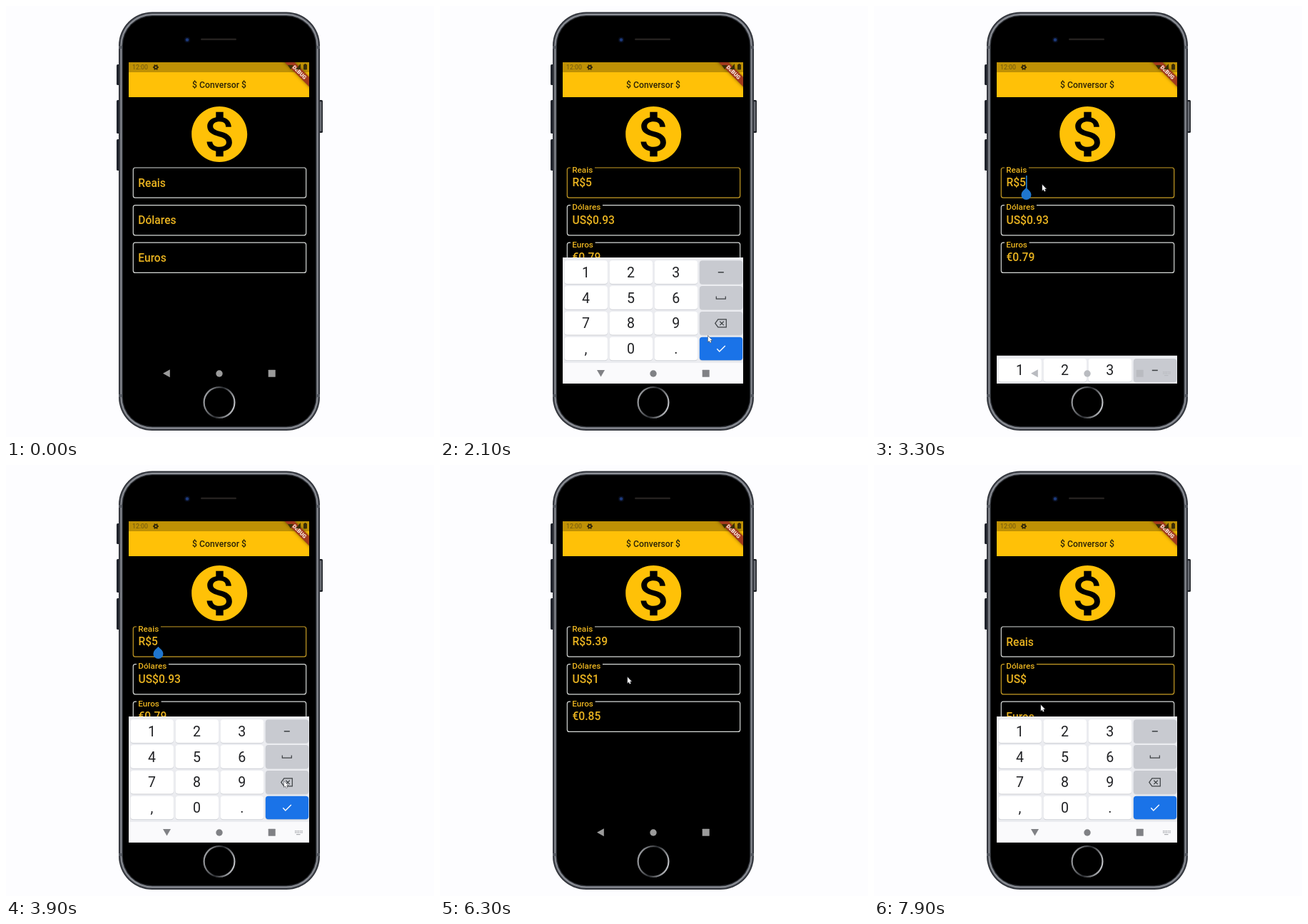
Animation of 600x605 px, one loop 8000 ms. Source, as an HTML page with a canvas:

```html
<!DOCTYPE html>
<html lang="pt">
<head>
<meta charset="utf-8">
<title>Conversor</title>
<style>
html, body { margin: 0; width: 100%; height: 100%; overflow: hidden; background: #fdfdff; }
canvas { display: block; }
</style>
</head>
<body>
<canvas id="stage" width="600" height="605"></canvas>
<script>
const ctx = document.getElementById('stage').getContext('2d');
const LOOP = 8000, END = 9e9;
const AMBER = '#ffc107', INK = '#e9b320', GREY = '#9b9b9b';
const COIN = new Path2D('M12 2C6.48 2 2 6.48 2 12s4.48 10 10 10 10-4.48 10-10S17.52 2 12 2zm1.41 16.09V20h-2.67v-1.93c-1.71-.36-3.16-1.46-3.27-3.4h1.96c.1 1.05.82 1.87 2.65 1.87 1.96 0 2.4-.98 2.4-1.59 0-.83-.44-1.61-2.67-2.14-2.48-.6-4.18-1.62-4.18-3.67 0-1.72 1.39-2.84 3.11-3.21V4h2.67v1.95c1.86.45 2.79 1.86 2.85 3.39H14.3c-.05-1.11-.64-1.87-2.22-1.87-1.5 0-2.4.68-2.4 1.64 0 .84.65 1.39 2.67 1.91s4.18 1.39 4.18 3.91c-.02 1.83-1.38 2.83-3.12 3.16z');

// Moments of the story
const TAP1 = 880, TYPE5 = 1500, DONE1 = 2120, TAP2 = 3200, ERASE1 = 4000;
const TAP3 = 4600, TYPE1 = 5030, DONE2 = 5900, TAP4 = 6400, ERASE2 = 7380;
const INPUTS = [TAP1, TYPE5, TAP2, ERASE1, TAP3, TYPE1, TAP4, ERASE2];
const KEYBOARD = [[TAP1 + 60, DONE1], [TAP2 + 40, DONE2 + 30], [TAP4 + 60, END]];
const HANDLE = [[TAP2, ERASE1], [TAP4, ERASE2]];

const FIELDS = [
  { label: 'Reais', prefix: 'R$', values: ['5', '5.39'],
    raised: [[TAP1, TAP3], [TYPE1, ERASE2]], focus: [[TAP1, DONE1], [TAP2, TAP3]] },
  { label: 'Dólares', prefix: 'US$', values: ['0.93', '1'],
    raised: [[TYPE5, ERASE1], [TAP3, END]], focus: [[TAP3, DONE2], [TAP4, END]] },
  { label: 'Euros', prefix: '€', values: ['0.79', '0.85'],
    raised: [[TYPE5, ERASE1], [TYPE1, ERASE2]], focus: [] }
];

// Pointer path: time, x, y
const POINTER = [
  [250, 330, 560], [800, 217, 249], [1150, 217, 249], [2000, 375, 461], [2300, 378, 470],
  [2900, 236, 251], [3450, 236, 251], [3850, 390, 444], [4150, 390, 444], [4550, 246, 304],
  [4700, 246, 304], [4950, 244, 332], [5250, 244, 332], [5750, 388, 478], [5950, 388, 478],
  [6250, 263, 298], [6500, 263, 298], [7000, 390, 444], [7450, 390, 444], [7850, 234, 337], [8000, 234, 337]
];

const smooth = u => { u = Math.min(1, Math.max(0, u)); return u * u * (3 - 2 * u); };
const inside = (spans, t) => spans.some(([a, b]) => t >= a && t < b);
const level = (spans, t) => spans.reduce((sum, [a, b]) => sum + smooth((t - a) / 200) - smooth((t - b) / 200), 0);

function box(x, y, w, h, r, fill) {
  ctx.beginPath();
  ctx.roundRect(x, y, w, h, r);
  ctx.fillStyle = fill;
  ctx.fill();
}
function disc(x, y, r, fill) {
  ctx.beginPath();
  ctx.arc(x, y, r, 0, 7);
  ctx.fillStyle = fill;
  ctx.fill();
}
function trace(points, closed) {
  ctx.beginPath();
  for (let i = 0; i < points.length; i += 2) ctx.lineTo(points[i], points[i + 1]);
  if (closed) ctx.closePath();
}
function poly(points, fill) {
  trace(points, true);
  ctx.fillStyle = fill;
  ctx.fill();
}
function line(points, stroke, width = 1.2, closed = false) {
  trace(points, closed);
  ctx.strokeStyle = stroke;
  ctx.lineWidth = width;
  ctx.stroke();
}
function text(s, x, y, size, fill, align = 'left', weight = 400) {
  ctx.font = `${weight} ${size}px Roboto, sans-serif`;
  ctx.textAlign = align;
  ctx.fillStyle = fill;
  ctx.fillText(s, x, y);
  return ctx.measureText(s).width;
}

function phone() {
  for (const [y, h] of [[82, 29], [132, 47], [187, 44]]) box(155, y, 5, h, 1.5, '#20242d');
  box(438, 132, 6, 46, 1.5, '#1c1f25');
  box(440, 134, 2.5, 42, 1, '#6b6e75');
  const shells = [[0, '#2b2e35'], [1.4, '#50535a'], [2.6, '#8d9097'], [4.4, '#33363c'], [5.8, '#000']];
  for (const [inset, fill] of shells)
    box(158 + inset, 8.5 + inset, 282 - 2 * inset, 587.5 - 2 * inset, 47 - inset, fill);
  for (const y of [56, 545]) {
    box(158, y, 4, 4, 0, '#565a62');
    box(436, y, 4, 4, 0, '#565a62');
  }
  disc(254, 47.5, 4, '#080d1c');
  disc(254, 47.5, 2.3, '#1c3a7c');
  box(273, 45.5, 50, 2.6, 1.3, '#24211f');
  const rim = ctx.createLinearGradient(277, 550, 321, 563);
  rim.addColorStop(0, '#a2a4a8');
  rim.addColorStop(.5, '#292b2f');
  rim.addColorStop(1, '#c6c8cc');
  ctx.beginPath();
  ctx.arc(299, 556.5, 21.4, 0, 7);
  ctx.strokeStyle = rim;
  ctx.lineWidth = 2.2;
  ctx.stroke();
}

function appBar() {
  box(172, 79, 253, 49, 0, AMBER);
  box(172, 79, 253, 14, 0, '#bf9105');
  text('12:00', 177, 89, 8.8, '#705810');
  disc(210, 86, 3, '#33280a');
  for (let a = 0; a < 6; a++) disc(210 + 3.1 * Math.cos(a * Math.PI / 3), 86 + 3.1 * Math.sin(a * Math.PI / 3), 1, '#33280a');
  disc(210, 86, 1.2, '#bf9105');
  text('$ Conversor $', 299, 115, 12.2, '#2b2207', 'center', 500);

  ctx.save();
  ctx.translate(411.5, 93);
  ctx.rotate(Math.PI / 4);
  ctx.shadowColor = 'rgba(0,0,0,.5)';
  ctx.shadowBlur = 4;
  box(-35, -4.8, 70, 9.6, 0, '#a23a1c');
  ctx.shadowBlur = 0;
  text('DEBUG', 0, 2.7, 7.5, '#fbeee8', 'center', 900);
  ctx.restore();

  poly([395, 83, 403, 83, 399, 89], '#3a2e08');
  poly([413, 81, 413, 89, 406, 89], '#3a2e08');
  box(417, 82, 5, 7.5, 1, '#3a2e08');
  box(418.5, 81, 2, 2, 0, '#3a2e08');

  ctx.save();
  ctx.translate(299.2 - 46.8, 180 - 46.8);
  ctx.scale(3.9, 3.9);
  ctx.fillStyle = AMBER;
  ctx.fill(COIN);
  ctx.restore();
}

function field(f, top, t) {
  const up = level(f.raised, t), focused = inside(f.focus, t);
  ctx.beginPath();
  ctx.roundRect(178.3, top, 242.4, 42.2, 3);
  ctx.strokeStyle = focused ? '#c79d25' : '#d6d9d7';
  ctx.lineWidth = 1.2;
  ctx.stroke();
  if (up > .01) {
    ctx.font = '500 11.7px Roboto, sans-serif';
    box(183, top - 2, (ctx.measureText(f.label).width + 5) * up, 4, 0, '#000');
  }

  let value = '';
  if (t >= TYPE5 && t < ERASE1) value = f.values[0];
  if (t >= TYPE1 && t < ERASE2) value = f.values[1];
  const base = top + 26;
  ctx.globalAlpha = up;
  const prefix = text(f.prefix, 185.5, base, 15.6, INK, 'left', 500);
  ctx.globalAlpha = 1;
  const caret = 186 + prefix + text(value, 185.5 + prefix, base, 15.6, INK, 'left', 500);
  text(f.label, 185.3, top + 26.7 - 20.2 * up, 15.6 - 3.9 * up, INK, 'left', 500);

  if (!focused) return;
  const since = t - Math.max(...INPUTS.filter(at => at <= t));
  if (since % 1000 < 500) box(caret - .5, base - 15, 1.6, 18, 0, '#2583d8');
  if (inside(HANDLE, t)) {
    disc(caret, top + 38, 7, '#1f76cf');
    poly([caret, top + 28, caret + 5, top + 33, caret - 5, top + 33], '#1f76cf');
  }
}

function keyboard(open) {
  ctx.save();
  ctx.translate(0, 177 * (1 - open));
  box(172, 353, 253, 177, 0, '#ebecf0');
  box(172, 501, 253, 29, 0, '#fafafc');
  ['123-', '456_', '789<', ',0.+'].forEach((row, r) => [...row].forEach((key, c) => {
    const x = 174.5 + 63.1 * c, y = 357.3 + 35.8 * r, cx = x + 30, cy = y + 16.5;
    const fill = key === '+' ? '#1a73e8' : c === 3 ? '#c8cad0' : '#fff';
    box(x, y + 1, 60.4, 32.6, 4, '#cfd1d6');
    box(x, y, 60.4, 32.6, 4, fill);
    if (c < 3) text(key, cx, cy + 7, 19.5, '#202124', 'center');
    else if (key === '-') line([cx - 4, cy, cx + 4, cy], '#3c4043', 1.5);
    else if (key === '_') line([cx - 6.5, cy - 2, cx - 6.5, cy + 1.5, cx + 6.5, cy + 1.5, cx + 6.5, cy - 2], '#3c4043');
    else if (key === '+') line([cx - 5.5, cy, cx - 2, cy + 3.7, cx + 6, cy - 4.3], '#fff', 1.4);
    else {
      line([cx - 8, cy, cx - 4, cy - 5.5, cx + 7.5, cy - 5.5, cx + 7.5, cy + 5.5, cx - 4, cy + 5.5], '#3c4043', 1.2, true);
      line([cx - 1.5, cy - 2.7, cx + 4, cy + 2.7], '#3c4043');
      line([cx - 1.5, cy + 2.7, cx + 4, cy - 2.7], '#3c4043');
    }
  }));
  ctx.restore();
}

function navigation(open, t) {
  const sliding = open > 0 && open < 1;
  const fill = open === 1 ? '#808185' : sliding ? '#b9bbc0' : GREY;
  poly(open === 1 ? [220, 511, 231, 511, 225.5, 520.5] : [229.8, 510.3, 229.8, 521.3, 220, 515.8], fill);
  disc(299, 516, 4.7, fill);
  box(367.7, 510.8, 10, 10, .5, fill);
  if (open > 0 && !(t > DONE1 - 60 && t < TAP2)) {
    const tone = sliding ? '#b9bbc0' : '#a9abb0';
    for (let i = 0; i < 10; i++) box(405 + i % 5 * 2.3, 513 + (i > 4) * 2.3, 1.4, 1.4, 0, tone);
    box(407, 518, 5.5, 1.2, 0, tone);
  }
}

function pointer(t) {
  const i = POINTER.findIndex(p => p[0] > t);
  if (i < 1) return;
  const [t0, x0, y0] = POINTER[i - 1], [t1, x1, y1] = POINTER[i];
  const u = smooth((t - t0) / (t1 - t0));
  ctx.save();
  ctx.translate(x0 + (x1 - x0) * u, y0 + (y1 - y0) * u);
  ctx.scale(.88, .88);
  const arrow = [0, 0, 0, 9, 2, 7.2, 3.4, 10.4, 4.9, 9.7, 3.5, 6.6, 6.2, 6.4];
  line(arrow, '#55575c', 1.2, true);
  poly(arrow, '#fff');
  ctx.restore();
}

function draw() {
  const t = performance.now() % LOOP;
  const open = level(KEYBOARD, t);
  box(0, 0, 600, 605, 0, '#fdfdff');
  phone();
  ctx.save();
  ctx.beginPath();
  ctx.rect(172, 79, 253, 451);
  ctx.clip();
  appBar();
  FIELDS.forEach((f, i) => field(f, 227 + 52.6 * i, t));
  if (open > 0) keyboard(open);
  navigation(open, t);
  ctx.restore();
  pointer(t);
  requestAnimationFrame(draw);
}
draw();
</script>
</body>
</html>
```
